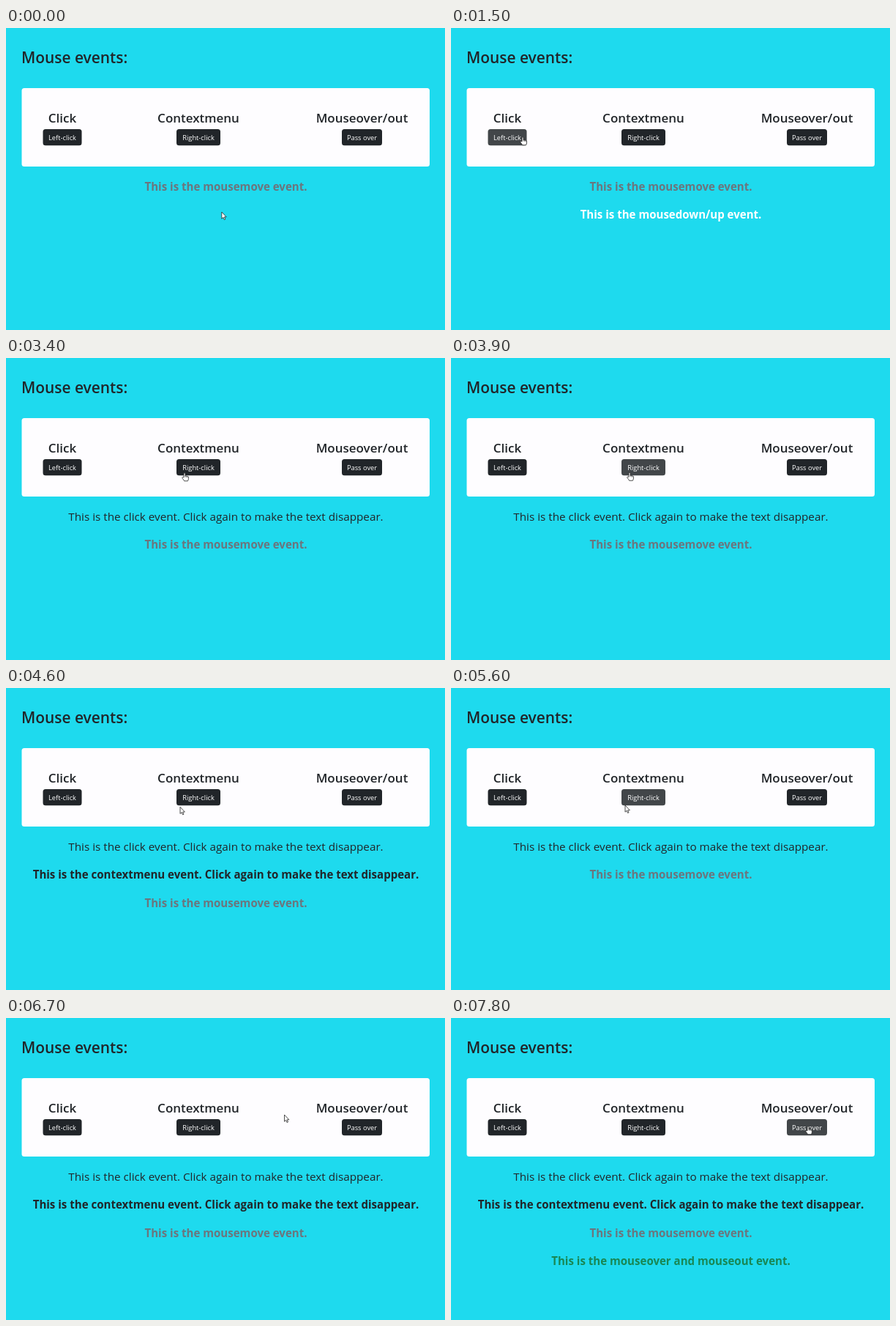
Write an HTML page that moves like this. It is 600 px wide and 412 px high and loops after 8000 ms.

```html
<!DOCTYPE html>
<html lang="en">
<meta charset="utf-8">
<title>Mouse events</title>
<style>
  html, body { margin: 0; width: 100%; height: 100%; overflow: hidden; background: #1edaee; }
  svg { display: block; width: 600px; height: 412px; }
  text { font-family: "Open Sans", "Noto Sans", sans-serif; fill: #212529; text-anchor: middle; }
  .title { font-size: 20.9px; font-weight: 600; text-anchor: start; }
  .head { font-size: 17px; font-weight: 600; }
  .label { font-size: 9.3px; fill: #fff; }
  .line { font-size: 15.05px; font-weight: 700; }
  #click { font-size: 15.25px; font-weight: 400; }
  #move { fill: #6c757d; }
  #down { fill: #fff; }
  #over { fill: #198754; }
  .cursor { fill: #fff; stroke: #222; stroke-width: .8; stroke-linejoin: round; }
</style>
<svg viewBox="0 0 600 412">
  <rect width="600" height="412" fill="#1edaee"/>
  <text class="title" x="21" y="48">Mouse events:</text>
  <rect x="21.5" y="82" width="557.5" height="107" rx="3.5" fill="#fefdff"/>
  <g id="columns"></g>
  <text class="line" id="click" x="300.5">This is the click event. Click again to make the text disappear.</text>
  <text class="line" id="context" x="300.5">This is the contextmenu event. Click again to make the text disappear.</text>
  <text class="line" id="move" x="300.5">This is the mousemove event.</text>
  <text class="line" id="down" x="300.5">This is the mousedown/up event.</text>
  <text class="line" id="over" x="300.5">This is the mouseover and mouseout event.</text>
  <path class="cursor" id="arrow" d="M0 0V9.2L2.1 7.3L3.5 10.5L5 9.9L3.6 6.8H6.4Z"/>
  <g class="cursor" id="hand">
    <path d="M-1 6V.8Q-1-.2 0-.2T1 .8V4Q2 3.3 2.7 4.2Q3.6 3.6 4.1 4.6Q5.4 4.3 5.4 5.8V7.6Q5.4 9.2 4.4 10.8H-.4Q-1 9.3-2.9 7.2Q-3.6 6-2.6 5.5Q-1.9 5.3-1 6Z"/>
    <path d="M1 4V5.8M2.7 4.2V6M4.1 4.6V6.2" stroke-width=".5"/>
  </g>
</svg>
<script>
const LOOP = 8000, STEP = 100;
const $ = id => document.getElementById(id);
const clamp = v => Math.max(0, Math.min(1, v));
const within = (t, spans) => spans.some(([a, b = LOOP]) => t >= a && t < b);

// Heading, label, centre, button left edge and width, hover spans
const columns = [
  ["Click", "Left-click", 77, 50.5, 53, [[900, 2500]]],
  ["Contextmenu", "Right-click", 263, 233, 60, [[3400, 4400], [4700, 6300]]],
  ["Mouseover/out", "Pass over", 486.5, 459, 55, [[7200]]]
];
$("columns").innerHTML = columns.map(([head, label, cx, x, w]) => `
  <text class="head" x="${cx}" y="129">${head}</text>
  <rect class="button" x="${x}" y="138" width="${w}" height="22.3" rx="3.5"/>
  <text class="label" x="${cx}" y="152.5">${label}</text>`).join("");
const buttons = document.querySelectorAll(".button");

// Message spans, in stacking order
const messages = {
  click: [[1600]],
  context: [[4400, 5100], [6300]],
  move: [[0]],
  down: [[1400, 1600], [4300, 4400], [4900, 5100], [6100, 6300]],
  over: [[7300]]
};
const handSpans = [[1000, 2500], [3400, 4400], [7200]];

// Pointer path: time, x, y
const path = [
  [0, 294.8, 251], [200, 312, 272], [350, 303, 295], [550, 230, 252], [900, 92, 165],
  [1100, 98, 149], [2400, 98, 149], [2700, 118, 166], [3100, 205, 168], [3400, 244, 157],
  [4300, 244, 156], [4500, 238, 162.3], [4600, 238, 162.3], [4700, 238, 160],
  [6300, 238, 160], [6700, 380.5, 132], [7200, 478, 146], [7400, 488, 148], [LOOP, 488, 148]
];

function pointer(t) {
  const i = path.findIndex(p => p[0] > t);
  const [t0, x0, y0] = path[i - 1], [t1, x1, y1] = path[i];
  const k = (t - t0) / (t1 - t0);
  return [x0 + (x1 - x0) * k, y0 + (y1 - y0) * k];
}

// Hover level with a 150 ms fade in and out
const hover = (t, spans) => Math.max(...spans.map(([a, b = LOOP]) =>
  Math.min(clamp((t - a) / 150), 1 - clamp((t - b) / 150))));

function draw(t) {
  columns.forEach((c, i) => {
    const k = hover(t, c[5]);
    buttons[i].setAttribute("fill", `rgb(${33 + 33 * k},${37 + 33 * k},${41 + 32 * k})`);
  });
  let row = 0;
  for (const id in messages) {
    const shown = within(t, messages[id]);
    $(id).style.display = shown ? "" : "none";
    if (shown) $(id).setAttribute("y", 222 + 38.3 * row++);
  }
  const hand = within(t, handSpans);
  $("hand").style.display = hand ? "" : "none";
  $("arrow").style.display = hand ? "none" : "";
  $(hand ? "hand" : "arrow").setAttribute("transform", `translate(${pointer(t)})`);
}

const start = performance.now();
function tick() {
  const t = Math.max(0, performance.now() - start) % LOOP;
  draw(Math.floor(t / STEP) * STEP);
  requestAnimationFrame(tick);
}
tick();
</script>
</html>
```
